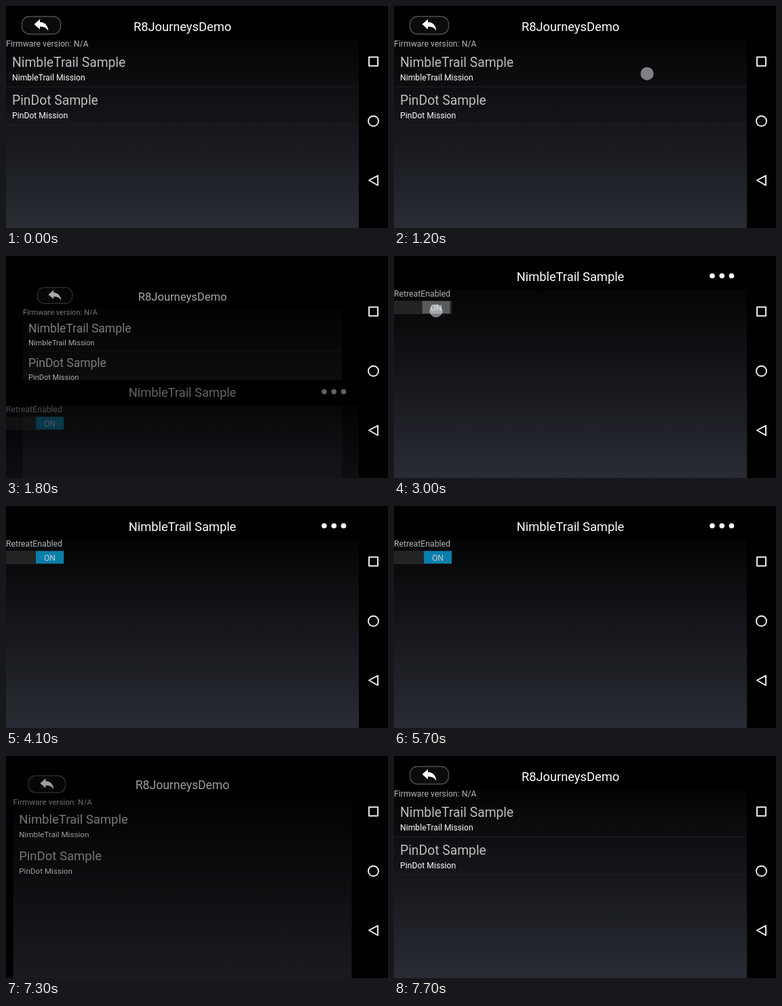
An HTML page that plays this animation: 563x328 px, repeating every 8 s.

```html
<!DOCTYPE html>
<html lang="en">
<head>
<meta charset="utf-8">
<title>Mission list demo</title>
<style>
  html, body { margin: 0; width: 100%; height: 100%; overflow: hidden; background: #000; }
  svg { display: block; width: 563px; height: 328px; font-family: Roboto, sans-serif; }
  .title { font-size: 18.3px; fill: #fff; text-anchor: middle; }
  .row { font-size: 19.3px; fill: #bdbdbd; }
  .sub { font-size: 12.2px; fill: #fff; }
  .note { font-size: 12.25px; fill: #b4b4b4; }
  .label { font-size: 12.2px; fill: #c4ccd0; text-anchor: middle; }
  .rule { fill: #1c1e21; }
  .nav { fill: none; stroke: #f2f2f2; stroke-width: 1.9; stroke-linejoin: round; }
</style>
</head>
<body>
<svg viewBox="0 0 563 328">
  <defs>
    <linearGradient id="shade" x1="0" y1="0" x2="0" y2="1">
      <stop offset="0" stop-color="#030405"/>
      <stop offset=".45" stop-color="#14161a"/>
      <stop offset="1" stop-color="#292c34"/>
    </linearGradient>
    <clipPath id="app"><rect width="520" height="328"/></clipPath>
  </defs>
  <rect width="563" height="328"/>

  <g clip-path="url(#app)">
    <g id="list">
      <rect y="12" width="520" height="38"/>
      <rect y="50" width="520" height="278" fill="url(#shade)"/>
      <rect x="23.5" y="15.5" width="57" height="26" rx="11" fill="#0b0b0b" stroke="#505050" stroke-width="1.3"/>
      <path d="M41.5 27 50 19.500v4.200c7 .2 12 5 12.300 13-2.800-4.700-6.300-6.200-12.300-6.200v4z" fill="#fff"/>
      <text class="title" x="260" y="36.5">R8JourneysDemo</text>
      <text class="note" x="0" y="60">Firmware version: N/A</text>
      <text class="row" x="9" y="89.5">NimbleTrail Sample</text>
      <text class="sub" x="9" y="110">NimbleTrail Mission</text>
      <rect class="rule" y="119" width="520" height="1"/>
      <text class="row" x="9" y="145.5">PinDot Sample</text>
      <text class="sub" x="9" y="166.3">PinDot Mission</text>
      <rect class="rule" y="175" width="520" height="1"/>
    </g>

    <g id="detail">
      <rect y="12" width="520" height="38"/>
      <rect id="body" y="50" width="520" height="278" fill="url(#shade)"/>
      <g id="content">
        <text class="title" x="260" y="36.5">NimbleTrail Sample</text>
        <g fill="#fff">
          <circle cx="469" cy="29.3" r="3.8"/>
          <circle cx="483.3" cy="29.3" r="3.8"/>
          <circle cx="497.5" cy="29.3" r="3.8"/>
        </g>
        <text class="note" x="0" y="60">RetreatEnabled</text>
        <rect y="66" width="85.5" height="20" fill="#232323"/>
        <g id="thumb">
          <rect id="knob" y="66.5" width="41" height="18.5"/>
          <text id="state" class="label" x="20.5" y="80.5">ON</text>
        </g>
      </g>
    </g>
  </g>

  <rect id="ripple" x="520" y="211" width="43" height="94" rx="20" fill="#fff"/>
  <rect class="nav" x="535" y="75.5" width="13" height="13"/>
  <circle class="nav" cx="541.5" cy="170" r="7.5"/>
  <path class="nav" d="M535 257.5 548 250.5v14.5z"/>
  <circle id="touch" r="9.7" fill="#f4f8ff"/>
</svg>

<script>
const LOOP = 8000, STEP = 100;
const $ = id => document.getElementById(id);
const [list, detail, body, content, thumb, knob, state, ripple, touch] =
  ['list', 'detail', 'body', 'content', 'thumb', 'knob', 'state', 'ripple', 'touch'].map($);

const progress = (t, start, length) => Math.min(1, Math.max(0, (t - start) / length));
const smooth = p => p * p * (3 - 2 * p);
const easeOut = (p, power) => 1 - (1 - p) ** power;

// start, x, y
const TAPS = [[1200, 373, 100], [2950, 62, 81], [3700, 62, 84], [4700, 487, 53], [6700, 541, 257]];

function drawList(t) {
  const back = 1 - easeOut(progress(t, 7150, 550), 3);
  const shrink = .105 * Math.min(back, smooth(progress(t, 1410, 480)));
  const drop = 20 * Math.min(back, smooth(progress(t, 1500, 400)));
  const dim = Math.min(back, progress(t, 1450, 600) ** 2);
  list.setAttribute('transform',
    `translate(261 ${164 + drop}) scale(${1 - shrink}) translate(-261 -164)`);
  list.setAttribute('opacity', 1 - dim);
}

function drawDetail(t) {
  const rise = 1 - easeOut(progress(t, 1739, 440), 5);
  const fall = progress(t, 6945, 350) ** 4;
  const fade = progress(t, 1740, 155);
  detail.setAttribute('transform', `translate(0 ${361 * (rise + fall)})`);
  body.setAttribute('opacity', Math.cbrt(fade));
  content.setAttribute('opacity', fade);

  const x = 44 - 43 * (smooth(progress(t, 2950, 350)) - smooth(progress(t, 3800, 300)));
  thumb.setAttribute('transform', `translate(${x} 0)`);
  knob.setAttribute('fill', t < 3000 || t >= 3900 ? '#087fab' : '#5a5a5a');
  state.textContent = x > 21 ? 'ON' : 'OFF';
}

function drawTouch(t) {
  const [start, x, y] = TAPS.findLast(tap => tap[0] <= t) || TAPS[0];
  touch.setAttribute('transform', `translate(${x} ${y})`);
  touch.setAttribute('opacity', t < start ? 0 : .5 * (1 - progress(t, start, 350) ** 2));
}

function render(now) {
  const t = Math.floor(now % LOOP / STEP) * STEP;
  drawList(t);
  drawDetail(t);
  drawTouch(t);
  ripple.setAttribute('opacity', t < 6700 ? 0 : .14 * (1 - progress(t, 6900, 320)));
}

const begin = performance.now();
function tick() {
  render(performance.now() - begin);
  requestAnimationFrame(tick);
}
tick();
</script>
</body>
</html>
```
